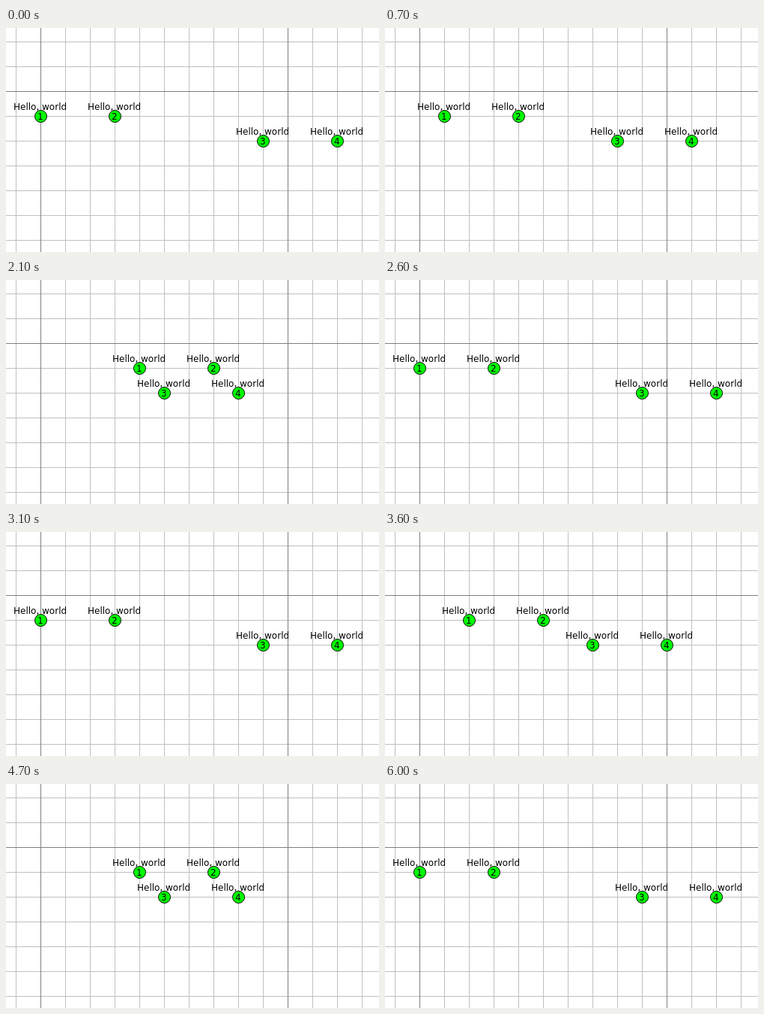
These frames come from a looping animation (498x298 px, 6400 ms). An HTML page:

```html
<!DOCTYPE html>
<html lang="en">
<head>
<meta charset="utf-8">
<title>Hello, world</title>
<style>
  html, body { margin: 0; width: 100%; height: 100%; overflow: hidden; background: #fff; }
  svg { display: block; width: 498px; height: 298px; }
  text { font: 12px "DejaVu Sans", sans-serif; fill: #000; }
  circle { fill: #0f0; stroke: #000; }
  .grid { fill: #c0c0c0; shape-rendering: crispEdges; }
  .grid .axis { fill: #808080; }
  .row { animation: hop 6400ms step-end infinite; }
  .rightward { --cell: 33px; }
  .leftward { --cell: -33px; }

  /* Nodes jump one grid cell at a time, then return to the start. */
  @keyframes hop {
    0%, 40.625%, 79.6875%, 100% { transform: translateX(0); }
    10.9375%, 50% { transform: translateX(var(--cell)); }
    17.1875%, 56.25% { transform: translateX(calc(2 * var(--cell))); }
    25%, 64.0625% { transform: translateX(calc(3 * var(--cell))); }
    32.8125%, 73.4375% { transform: translateX(calc(4 * var(--cell))); }
  }
</style>
</head>
<body>
<svg viewBox="0 0 498 298">
  <g class="grid"></g>
  <g class="row rightward"></g>
  <g class="row leftward"></g>
</svg>
<script>
  const WIDTH = 498, HEIGHT = 298, CELL = 33;

  function add(parent, tag, attrs, text = "") {
    const el = document.createElementNS("http://www.w3.org/2000/svg", tag);
    for (const [key, value] of Object.entries(attrs)) el.setAttribute(key, value);
    el.textContent = text;
    parent.append(el);
  }

  function addNode(parent, x, y, number) {
    add(parent, "circle", { cx: x + 0.5, cy: y + 0.5, r: 8 });
    add(parent, "text", { x: x - 4, y: y + 5 }, number);
    add(parent, "text", { x: x - 36, y: y - 8 }, "Hello, world");
  }

  const grid = document.querySelector(".grid");
  const column = (x, cls) => add(grid, "rect", { x, y: 0, width: 1, height: HEIGHT, class: cls });
  const line = (y, cls) => add(grid, "rect", { x: 0, y, width: WIDTH, height: 1, class: cls });

  for (let x = 13; x < WIDTH; x += CELL) column(x, "minor");
  for (let y = 18; y < HEIGHT; y += CELL) line(y, "minor");
  column(46, "axis");
  column(376, "axis");
  line(84, "axis");

  const rightward = document.querySelector(".rightward");
  const leftward = document.querySelector(".leftward");
  addNode(rightward, 46, 117, 1);
  addNode(rightward, 145, 117, 2);
  addNode(leftward, 343, 150, 3);
  addNode(leftward, 442, 150, 4);
</script>
</body>
</html>
```
